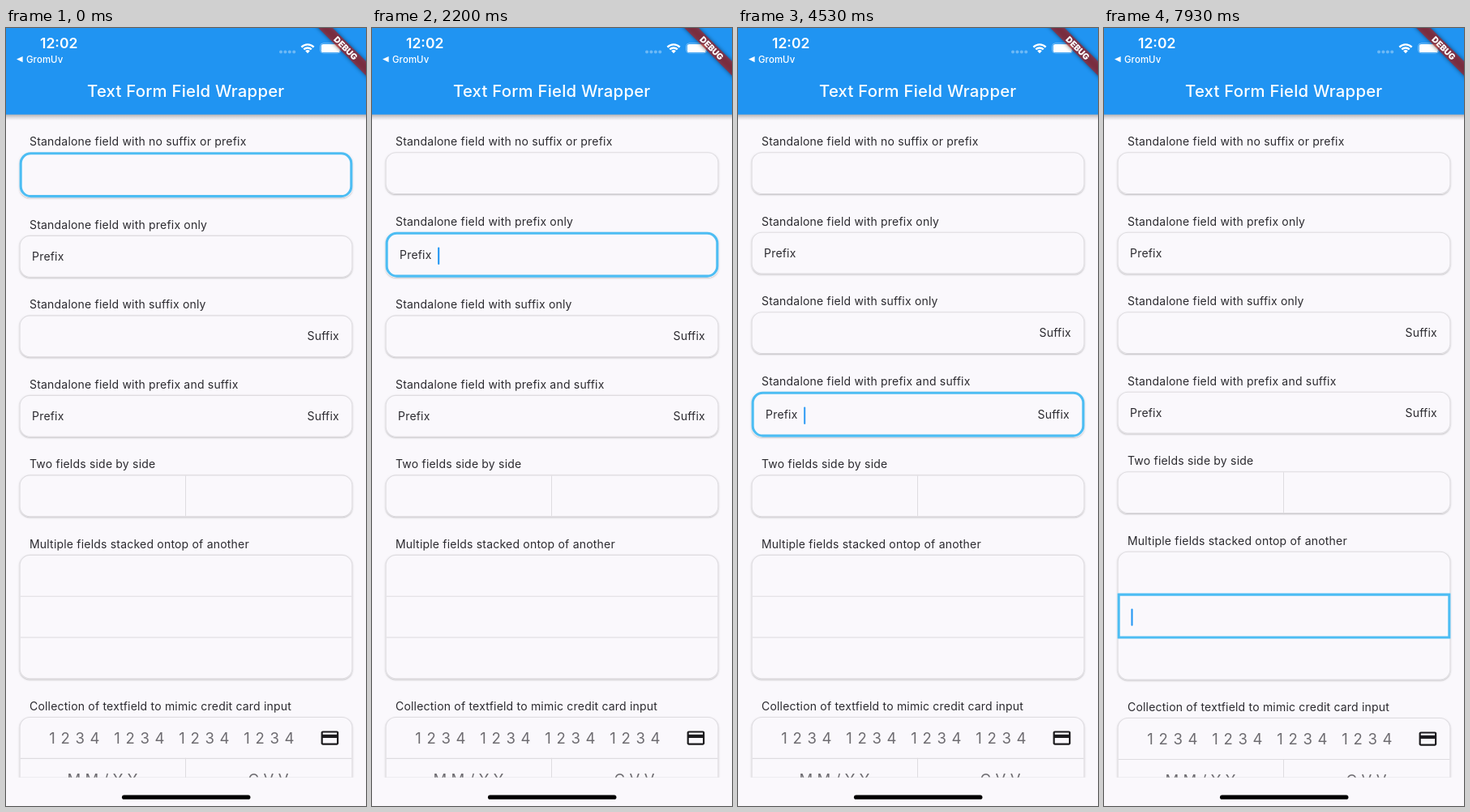
An HTML page with a canvas that plays this animation: 444x960 px, repeating every 8 s.

```html
<!DOCTYPE html>
<html lang="en">
<head>
<meta charset="utf-8">
<title>Text Form Field Wrapper</title>
<style>
html, body { margin: 0; width: 100%; height: 100%; overflow: hidden; background: #faf8fc; }
canvas { display: block; width: 444px; height: 960px; }
</style>
</head>
<body>
<canvas id="stage"></canvas>
<script>
const W = 444, H = 960, LOOP = 8000;
const U = W / 428;                     // one logical point
const BG = '#faf8fc', LINE = '#dedce0', FOCUS = '#4dbdf3', BLUE = '#2094f2', INK = '#2b2a2f';
const LEFT = 16.6, RIGHT = W - 16.6, MID = 221.5;
const ROW = 48 * U, THIN = U, THICK = 3 * U, GROW = 4 * U, BOX = 50 * U, RADIUS = 12 * U;
const PITCH = 98.5, LABEL_GAP = 13.2;

const canvas = document.getElementById('stage');
const dpr = window.devicePixelRatio || 1;
canvas.width = W * dpr;
canvas.height = H * dpr;
const ctx = canvas.getContext('2d');

// When each field takes the focus: four single, two halves, two stacked rows.
const focusTimes = [-950, 1870, 2670, 3870, 5200, 6070, 7020, 7900];

const easeOut = p => 1 - Math.pow(1 - p, 1.8);

function cursorAlpha(age) {
  const u = age - 650;
  if (u < 0) return 1;
  const p = easeOut(Math.min(1, (u % 500) / 250));
  return Math.floor(u / 500) % 2 ? p : 1 - p;
}

function text(str, x, y, { size = 14, weight = 400, color = INK, align = 'left', gap = 0.2 } = {}) {
  ctx.font = `${weight} ${size}px Inter, "Open Sans", sans-serif`;
  ctx.letterSpacing = gap + 'px';
  ctx.textAlign = align;
  ctx.fillStyle = color;
  ctx.fillText(str, x, y);
}

function rect(x, y, w, h, color, radii = 0) {
  ctx.beginPath();
  ctx.roundRect(x, y, w, h, radii);
  ctx.fillStyle = color;
  ctx.fill();
}

// Border drawn inside the outer edge; radii run clockwise from top left.
function frame(x, y, w, h, width, color, radii) {
  ctx.beginPath();
  ctx.roundRect(x + width / 2, y + width / 2, w - width, h - width, radii);
  ctx.lineWidth = width;
  ctx.strokeStyle = color;
  ctx.stroke();
}

function card(x, y, w, h, radii = RADIUS) {
  ctx.save();
  ctx.shadowColor = 'rgba(0,0,0,0.24)';
  ctx.shadowBlur = 2 * dpr;
  ctx.shadowOffsetY = dpr;
  rect(x, y, w, h, BG, radii);
  ctx.restore();
  frame(x, y, w, h, THIN, LINE, radii);
}

function highlight(x, y, w, h, radii = RADIUS) {
  rect(x, y, w, h, BG, radii);
  frame(x, y, w, h, THICK, FOCUS, radii);
}

function cursor(x, mid, alpha) {
  ctx.globalAlpha = alpha;
  rect(x - U, mid - 9.2, 2 * U, 21.4, '#2196f3', 1);
  ctx.globalAlpha = 1;
}

function label(str, y) {
  text(str, 29, y + 5.1);
}

function singleField(y, focused, alpha, prefix, suffix) {
  const h = BOX + (focused ? GROW : 0), mid = y + h / 2, inset = focused ? 2 : 0;
  card(LEFT, y, RIGHT - LEFT, h);
  if (focused) highlight(LEFT, y, RIGHT - LEFT, h);
  if (prefix) text('Prefix', 32 + inset, mid + 5.2);
  if (suffix) text('Suffix', 410.9 - inset, mid + 5.2, { align: 'right' });
  if (focused) cursor(prefix ? 82.2 : 34.5, mid, alpha);
}

function pairField(y, side, alpha) {
  const w = RIGHT - LEFT, tall = BOX + GROW;
  if (side < 0) {
    card(LEFT, y, w, BOX);
    rect(MID - THIN / 2, y + THIN, THIN, BOX - 2 * THIN, LINE);
    return;
  }
  card(LEFT, y + GROW / 2, w, BOX);
  const r = RADIUS;
  if (side === 0) highlight(LEFT, y, MID + 0.5 - LEFT, tall, [r, 0, 0, r]);
  else highlight(MID - 0.5, y, RIGHT - MID + 0.5, tall, [0, r, r, 0]);
  cursor(side === 0 ? 34.5 : MID + 17.5, y + tall / 2, alpha);
}

function stackHeight(row) {
  return 3 * ROW + 4 * THIN + (row < 0 ? 0 : GROW) + (row === 1 ? THIN : 0);
}

function stackField(y, row, alpha) {
  const w = RIGHT - LEFT, h = stackHeight(row), tall = BOX + GROW;
  card(LEFT, y, w, h);
  const divider = dy => rect(LEFT + THIN, dy, w - 2 * THIN, THIN, LINE);
  if (row < 0) divider(y + ROW + THIN);
  if (row !== 1) divider(y + h - ROW - 2 * THIN);
  if (row < 0) return;
  const top = row === 0 ? y : y + ROW + 2 * THIN;
  highlight(LEFT, top, w, tall, row === 0 ? [RADIUS, RADIUS, 0, 0] : 0);
  cursor(34.5, top + tall / 2, alpha);
}

function paymentField(y) {
  const hint = { size: 18.5, color: '#6e6c71', gap: 6.7 };
  card(LEFT, y, RIGHT - LEFT, 2 * ROW + 3 * THIN);
  rect(LEFT + THIN, y + ROW + THIN, RIGHT - LEFT - 2 * THIN, THIN, LINE);
  rect(MID - THIN / 2, y + ROW + THIN, THIN, ROW, LINE);
  for (let i = 0; i < 4; i++) text('1234', 53.2 + 80 * i, y + 33, hint);
  text('MM/YY', 75.5, y + 84, { ...hint, gap: 5.4 });
  text('CVV', 298.5, y + 84, { ...hint, gap: 5.4 });

  const x = 388.6, top = y + 17.4, k = 1.08;
  rect(x, top, 20 * k, 16 * k, '#1b1a1d', 2 * k);
  rect(x + 2 * k, top + 2 * k, 16 * k, 2 * k, BG);
  rect(x + 2 * k, top + 8 * k, 16 * k, 6 * k, BG);
}

function form(active, alpha) {
  ctx.save();
  ctx.beginPath();
  ctx.rect(0, 106, W, 818.7);
  ctx.clip();

  const singles = [
    ['Standalone field with no suffix or prefix', false, false],
    ['Standalone field with prefix only', true, false],
    ['Standalone field with suffix only', false, true],
    ['Standalone field with prefix and suffix', true, true]
  ];
  let y = 140;
  singles.forEach(([name, prefix, suffix], i) => {
    label(name, y);
    singleField(y + LABEL_GAP, active === i, alpha, prefix, suffix);
    y += PITCH + (active === i ? GROW : 0);
  });

  const side = active === 4 || active === 5 ? active - 4 : -1;
  label('Two fields side by side', y);
  pairField(y + LABEL_GAP, side, alpha);
  y += PITCH + (side < 0 ? 0 : GROW);

  const row = active > 5 ? active - 6 : -1;
  label('Multiple fields stacked ontop of another', y);
  stackField(y + LABEL_GAP, row, alpha);
  y += PITCH - BOX + stackHeight(row);

  label('Collection of textfield to mimic credit card input', y);
  paymentField(y + LABEL_GAP);
  ctx.restore();
}

function wifi(x, y) {
  ctx.strokeStyle = '#fff';
  ctx.lineWidth = 2.4;
  for (const r of [6.7, 10.8]) {
    ctx.beginPath();
    ctx.arc(x, y, r, -Math.PI * 0.75, -Math.PI * 0.25);
    ctx.stroke();
  }
  ctx.beginPath();
  ctx.moveTo(x, y);
  ctx.arc(x, y, 4, -Math.PI * 0.75, -Math.PI * 0.25);
  ctx.fillStyle = '#fff';
  ctx.fill();
}

function banner() {
  ctx.save();
  ctx.translate(W, 0);
  ctx.rotate(Math.PI / 4);
  const band = color => rect(-60, 28 * U, 120, 12 * U, color);
  ctx.filter = `blur(${2.5 * dpr}px)`;
  band('rgba(0,0,0,0.5)');
  ctx.filter = 'none';
  band('rgba(183,28,28,0.627)');
  text('DEBUG', 0, 34 * U + 3.8, { size: 10.4, weight: 900, color: '#fff', align: 'center', gap: 0 });
  ctx.restore();
}

function appBar() {
  const shade = ctx.createLinearGradient(0, 107, 0, 114);
  shade.addColorStop(0, 'rgba(0,0,0,0.27)');
  shade.addColorStop(0.45, 'rgba(0,0,0,0.12)');
  shade.addColorStop(1, 'rgba(0,0,0,0)');
  rect(0, 106, W, 8, shade);
  rect(0, 0, W, 106.85, BLUE);

  text('12:02', 42, 24.6, { size: 17.5, weight: 600, color: '#fff', gap: 0 });
  ctx.beginPath();
  ctx.moveTo(13, 38.6);
  ctx.lineTo(20.6, 35);
  ctx.lineTo(20.6, 42.2);
  ctx.fillStyle = '#fff';
  ctx.fill();
  text('GromUv', 25, 42.7, { size: 11.4, weight: 500, color: '#fff', gap: 0.1 });
  text('Text Form Field Wrapper', 221.7, 84.8, { size: 20.3, weight: 500, color: '#fff', align: 'center', gap: 0.24 });

  for (let i = 0; i < 4; i++) rect(337 + 5.4 * i, 27.6, 4, 4, 'rgba(255,255,255,0.35)', 2);
  wifi(372, 31.2);
  frame(387, 18.3, 26.5, 13.2, 1, 'rgba(255,255,255,0.4)', 4);
  rect(388.8, 20, 23, 10, '#fff', 2.6);
  banner();
}

function draw(t) {
  let active = 0;
  focusTimes.forEach((start, i) => { if (t >= start) active = i; });
  ctx.setTransform(dpr, 0, 0, dpr, 0, 0);
  rect(0, 0, W, H, BG);
  form(active, cursorAlpha(t - focusTimes[active]));
  appBar();
  rect(143, 946.6, 158.4, 5.2, '#000', 2.6);
}

const begin = performance.now();
function tick() {
  draw((performance.now() - begin) % LOOP);
  requestAnimationFrame(tick);
}
tick();
</script>
</body>
</html>
```
